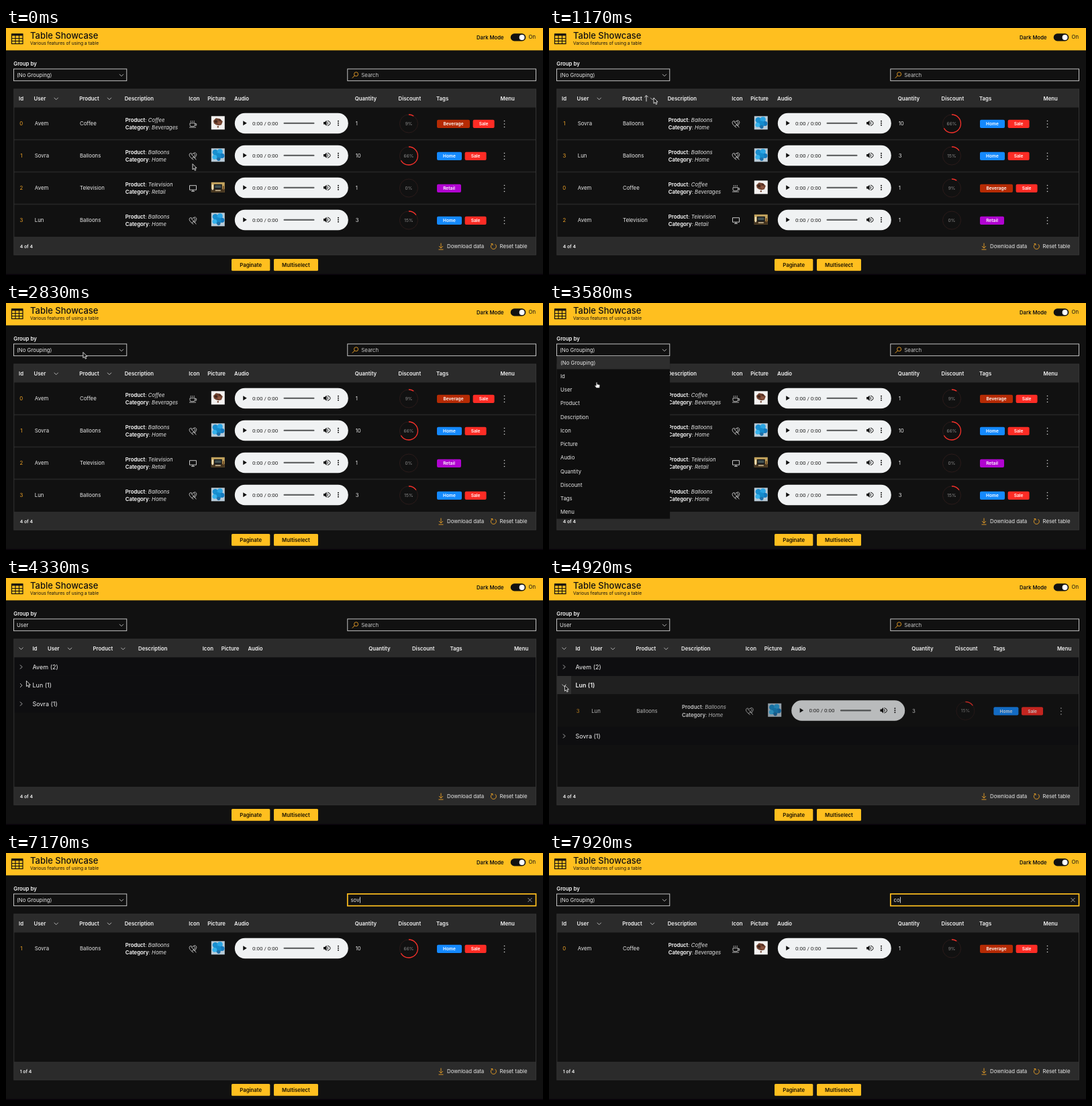
Animation of 800x368 px, one loop 8 s. Source, as an HTML page:

```html
<!DOCTYPE html>
<html lang="en">
<head>
<meta charset="utf-8">
<title>Table Showcase</title>
<style>
  html, body { margin: 0; width: 100%; height: 100%; overflow: hidden; background: #111; }
  svg { display: block; width: 100vw; height: 100vh; font-family: Inter, sans-serif; }
  text { white-space: pre; }
</style>
</head>
<body>
<svg id="stage" viewBox="0 0 800 368" xmlns="http://www.w3.org/2000/svg"></svg>
<script>
const LOOP = 8000, FADE = 450;
const AMBER = '#ffbf1f', ORANGE = '#f0a326', LIGHT = '#e9e9e9', BAR = '#2b2b2b';
const stage = document.getElementById('stage');
const pen = document.createElement('canvas').getContext('2d');

// ---------- drawing helpers ----------
const text = (x, y, s, o = {}) =>
  `<text x="${x}" y="${y}" font-size="${o.size || 7.8}" font-weight="${o.weight || 400}" fill="${o.fill || LIGHT}"` +
  `${o.anchor ? ` text-anchor="${o.anchor}"` : ''}${o.font ? ` font-family="${o.font}"` : ''}>${s}</text>`;
const rect = (x, y, w, h, fill, extra = '') =>
  `<rect x="${x}" y="${y}" width="${w}" height="${h}" fill="${fill}" ${extra}/>`;
const dot = (x, y, r, fill) => `<circle cx="${x}" cy="${y}" r="${r}" fill="${fill}"/>`;
const line = (d, color = LIGHT, w = 0.9, extra = '') =>
  `<path d="${d}" fill="none" stroke="${color}" stroke-width="${w}" ${extra}/>`;
const group = (x, y, body, extra = '') => `<g transform="translate(${x} ${y})" ${extra}>${body}</g>`;
const chevron = (x, y, turn = 0) =>
  group(x, y, `<g transform="rotate(${turn})">${line('M-3 -1.5L0 1.5L3 -1.5', '#c4c4c4', 0.9)}</g>`);

// ---------- data ----------
const products = {
  Coffee: { category: 'Beverages', icon: cupIcon, picture: coffeePicture },
  Balloons: { category: 'Home', icon: heartIcon, picture: balloonPicture },
  Television: { category: 'Retail', icon: screenIcon, picture: screenPicture }
};
const tags = {
  Beverage: [49, '#b52b04'], Sale: [32, '#fd2c25'], Home: [37, '#1489fd'], Retail: [36, '#b004d0']
};
const rows = [
  { id: 0, user: 'Avem', product: 'Coffee', quantity: 1, discount: 9, tags: ['Beverage', 'Sale'] },
  { id: 1, user: 'Sovra', product: 'Balloons', quantity: 10, discount: 66, tags: ['Home', 'Sale'] },
  { id: 2, user: 'Avem', product: 'Television', quantity: 1, discount: 0, tags: ['Retail'] },
  { id: 3, user: 'Lun', product: 'Balloons', quantity: 3, discount: 15, tags: ['Home', 'Sale'] }
];
const columns = {
  Id: 19, User: 41.5, Product: 109.2, Description: 176.7, Icon: 272.3, Picture: 300.3,
  Audio: 340, Quantity: 519.8, Discount: 584.6, Tags: 641, Menu: 736.5
};

// ---------- icons and pictures, centred on 0,0 ----------
function cupIcon() {
  return line('M-4.5 -1H3V2Q3 4-0 4H-2Q-4.5 4-4.5 2ZM3 0H5.2V2.4H2.8M-5.5 5.3H4.5M-3 -2.3Q-4 -3.3-3 -4.6M-.5 -2.3Q-1.5 -3.3-.5 -4.6M2 -2.3Q1 -3.3 2 -4.6', '#ddd', 0.8);
}
function heartIcon() {
  return line('M-1.8 3.8L-4.8 .4C-7 -3.4-2.8 -6-1 -2.6C1.4 -5.6 4.6 -2.2 2.4 .2ZM.8 -3.7C2.4 -6.4 6.6 -4 5 -.8L2.8 3L.8 1.9M-1.8 3.8L.8 5.6M2.8 3L4.8 5.6M-3 -3L3 3', '#ddd', 0.8);
}
function screenIcon() {
  return line('M-5 -4H5V2.5H-5ZM0 2.5V4.6M-2.5 4.6H2.5', '#ddd', 0.9);
}
function coffeePicture() {
  return rect(-10, -10, 20, 20, '#f4f2f1') +
    '<path d="M-7 -3L-3 -7L3 -6L7 -2L5 3L1 4L-3 3L-6 1Z" fill="#70422f"/>' +
    dot(-3, -2, 2, '#42261c') + dot(2, 0, 2.4, '#8d5540') + dot(3, -4, 1.4, '#4e2c22') + dot(0, 6, 1.2, '#70422f');
}
function balloonPicture() {
  return rect(-10, -10, 20, 20, '#b9cbd8') +
    dot(-4, -4, 4.2, '#1a8fd0') + dot(3, -5, 4, '#2aa5e4') + dot(6, 1, 3.6, '#1679bd') +
    dot(0, 2, 5, '#158bcc') + dot(-5, 3, 3.4, '#36b2ec') + dot(1, 6, 2.6, '#1f6fa8');
}
function screenPicture() {
  return rect(-10, -7.5, 20, 15, '#c4a45e') + rect(-10, 2.5, 20, 5, '#44341f') +
    rect(-6, -4.5, 12, 7.5, '#16191c') + rect(-4.5, -3, 9, 4, '#435252') +
    rect(-9, -4, 2, 8, '#f0e5c5') + rect(7, -2, 2, 6, '#765027') + rect(-4, 4, 8, 1.5, '#d3c09a');
}

// ---------- table parts ----------
function audio(y) {
  return rect(340.8, y - 15.7, 169, 30.4, '#f0f2f3', 'rx="15.2"') +
    group(0, y - 0.7,
      '<path d="M353.2 -3.5V3.5L358.8 0Z" fill="#111"/>' +
      text(367, 2.7, '0:00 / 0:00', { size: 8, fill: '#222', font: 'Roboto, sans-serif' }) +
      rect(413.5, -1.1, 46, 2.2, '#636566', 'rx="1"') +
      '<path d="M473 -1.7H475L477.6 -4.2V4.2L475 1.7H473Z" fill="#111"/>' +
      line('M478.8 -2Q480.6 0 478.8 2M479 -3.8Q483.2 -2.6 483.2 0T479 3.8', '#111', 1) +
      [-3, 0, 3].map(d => dot(495, d, 1, '#111')).join(''));
}

function ring(y, percent) {
  const r = 13.5, len = 2 * Math.PI * r;
  const circle = (color, w, extra) =>
    `<circle cx="600" cy="${y}" r="${r}" fill="none" stroke="${color}" stroke-width="${w}" ${extra}/>`;
  return circle('#2b1b1a', 1, '') +
    (percent ? circle('#f5302a', 1.3, `stroke-dasharray="${len * percent / 100} ${len}" transform="rotate(-90 600 ${y})"`) : '') +
    text(600, y + 2.4, percent + '%', { size: 6.7, fill: '#8c8c8c', anchor: 'middle' });
}

function tagList(y, names) {
  let x = 642;
  return names.map(name => {
    const [w, color] = tags[name];
    const out = rect(x, y - 5.8, w, 12.4, color, 'rx="2"') +
      text(x + w / 2, y + 2.8, name, { size: 6.6, weight: 600, fill: '#fff', anchor: 'middle' });
    x += w + 4.6;
    return out;
  }).join('');
}

function tableRow(row, y, shift, opacity) {
  const p = products[row.product];
  const pair = (dy, key, value) =>
    text(177.7, y + dy, `<tspan font-weight="600" fill="#fff">${key}</tspan>: <tspan font-style="italic">${value}</tspan>`);
  return group(shift, 0,
    text(22.8, y + 2.8, row.id, { fill: ORANGE, anchor: 'middle' }) +
    text(42.8, y + 2.8, row.user) + text(110, y + 2.8, row.product) +
    pair(-2.6, 'Product', row.product) + pair(8.5, 'Category', p.category) +
    group(278.5, y + 0.2, p.icon()) + group(315.8, y - 1.2, p.picture()) +
    audio(y) + text(520.7, y + 2.8, row.quantity) + ring(y, row.discount) + tagList(y, row.tags) +
    [-4, 0.5, 5].map(d => dot(742.5, y + d, 0.8, '#ddd')).join(''),
    `opacity="${opacity.toFixed(3)}"`);
}

function tableHead(s) {
  const dx = s.group ? 20.4 : 0;
  const names = Object.entries(columns).map(([name, x]) =>
    text(x, 108, name, { weight: 600, fill: '#f2f2f2' })).join('');
  const arrow = s.sort ? group(145, 105,
    line('M0 -4.5V4.5M-2.7 1.8L0 4.5L2.7 1.8', '#ddd', 1, s.sort > 0 ? 'transform="scale(1 -1)"' : '')) : '';
  return rect(12, 91, 777.5, 27.5, BAR) + (s.group ? chevron(22.5, 105) : '') +
    group(dx, 0, names + chevron(74.7, 105.3) + chevron(154, 105.3) + arrow);
}

function groupedBody(s) {
  let y = 118.5, out = '';
  for (const user of [...new Set(rows.map(r => r.user))].sort()) {
    const own = rows.filter(r => r.user === user), open = s.open === user;
    if (open) out += rect(12, y, 777.5, 27, '#202020') + rect(12, y, 21, 27, '#303030');
    else out += rect(12, y, 777.5, 27, '#0e0e10');
    out += chevron(22.5, y + 14, open ? 0 : -90) +
      text(39.5, y + 17, `${user} (${own.length})`, { size: 9, weight: open ? 600 : 400, fill: '#f2f2f2' });
    y += 27.5;
    if (open) own.forEach(r => {
      out += tableRow(r, y + 24.5, 20.4, s.fade);
      y += 48;
    });
  }
  return out;
}

function flatBody(s) {
  return s.rows.map((r, i) => {
    const y = 142.5 + i * 48;
    return tableRow(r, y, 0, s.fade) + (i < s.rows.length - 1 ? rect(12, y + 23.2, 777.5, 1.6, '#262626') : '');
  }).join('');
}

function banner() {
  return rect(0, 0, 800, 33.3, AMBER) +
    rect(8.5, 9, 16.5, 14.5, 'none', 'stroke="#111" stroke-width="1.2"') + rect(8.5, 8.5, 16.5, 3, '#111') +
    line('M8.5 15.5H25M8.5 19.5H25M14 11V23.5M19.5 11V23.5', '#111', 1.1) +
    text(36, 16.2, 'Table Showcase', { size: 13, weight: 500, fill: '#111' }) +
    text(36, 25, 'Various features of using a table', { size: 6.7, fill: '#111' }) +
    text(701, 16.6, 'Dark Mode', { size: 7.7, weight: 600, fill: '#111' }) +
    rect(751.7, 8.3, 22.6, 11.2, '#111', 'rx="5.6"') + dot(768.6, 13.9, 4, '#fff') +
    text(778.5, 16.4, 'On', { fill: '#111' });
}

function controls(s) {
  const frame = (x, w, color, lw) => rect(x, 61, w, 17.7, '#111', `stroke="${color}" stroke-width="${lw}"`);
  let out = text(11.3, 56, 'Group by', { weight: 600, fill: '#f4f4f4' }) +
    frame(11.5, 168.3, '#d8d8d8', 0.9) + text(16, 72.8, s.group || '(No Grouping)') + chevron(172, 70.3) +
    frame(508.8, 280.7, s.focus ? AMBER : '#d8d8d8', s.focus ? 1.7 : 0.9);
  if (s.query) {
    pen.font = '7.8px Inter, sans-serif';
    const x = 514 + pen.measureText(s.query).width;
    out += text(513.5, 72.6, s.query) + rect(x, 65.5, 0.8, 9, '#fff') +
      line('M777.5 67L783.5 73M783.5 67L777.5 73', '#bbb', 0.8);
  } else {
    out += `<circle cx="521.6" cy="68.8" r="3" fill="none" stroke="${ORANGE}" stroke-width=".9"/>` +
      line('M519.4 71L515.8 74.6', ORANGE, 1) + text(529.3, 72.8, 'Search', { fill: '#c8c8c8' });
  }
  return out;
}

function footer(s) {
  const count = s.group ? 4 : s.rows.length;
  const button = (x, w, label) => rect(x, 344, w, 17.8, AMBER, 'rx="1.5"') +
    text(x + w / 2, 355.8, label, { weight: 600, fill: '#1a1300', anchor: 'middle' });
  return rect(12, 311, 777.5, 27, BAR) +
    text(20.7, 327.6, count + ' of 4', { size: 6.8, weight: 600, fill: '#f2f2f2' }) +
    line('M648 320.5V328M645 325L648 328L651 325M644.5 330H651.5', ORANGE, 0.9) + text(657, 328, 'Download data') +
    line('M724.3 322A4 4 0 1 0 728.6 322.1M722.5 321.5H725V324', ORANGE, 0.9) + text(735.5, 328, 'Reset table') +
    rect(11.8, 91, 777.7, 247, 'none', 'stroke="#343434" stroke-width="1"') +
    button(336, 57.3, 'Paginate') + button(399, 66, 'Multiselect');
}

function menu() {
  const items = ['(No Grouping)', ...Object.keys(columns)];
  return rect(11.5, 79, 168.6, 242.5, '#0e0e0e') + rect(11.5, 79, 168.6, 19.6, '#2e2e2e') +
    items.map((name, i) => text(17, 91.5 + i * 20.27, name)).join('');
}

// ---------- pointer ----------
const path = [
  [0, 278, 202.5], [150, 278, 202.5], [700, 156, 104], [1500, 156, 104], [1830, 157.5, 103], [2350, 157.5, 103],
  [2950, 110, 70], [3250, 100, 70], [3580, 71, 118], [3800, 58, 128], [4050, 58, 128],
  [4450, 23, 160], [5050, 23.5, 160], [5480, 748, 325], [5700, 748, 325], [5980, 551, 64], [6300, 551, 68]
];
function pointerAt(t) {
  const i = path.findIndex(p => p[0] > t);
  if (i < 0) return path[path.length - 1].slice(1);
  const [t0, x0, y0] = path[i - 1], [t1, x1, y1] = path[i];
  const k = (t - t0) / (t1 - t0), e = k * k * (3 - 2 * k);
  return [x0 + (x1 - x0) * e, y0 + (y1 - y0) * e];
}
function pointer(t) {
  if (t >= 6500) return '';
  const [x, y] = pointerAt(t);
  const shapes = {
    arrow: '<path d="M0 0V8.4L2 6.7L3.4 9.8L4.9 9.1L3.5 6.1H6Z" fill="#111" stroke="#fff" stroke-width=".8"/>',
    hand: '<path d="M-.8 .4Q0 -.6 .8 .4V3L4 3.8Q5 4.1 4.8 5L4.2 8.6H-.4L-2.8 5.4Q-2.6 4.2-.8 5.2Z" fill="#fff" stroke="#222" stroke-width=".6"/>',
    beam: line('M-2 -4.5Q0 -4.5 0 -3V3Q0 4.5-2 4.5M2 -4.5Q0 -4.5 0 -3V3Q0 4.5 2 4.5M-1.2 1H1.2', '#111', 2.2) +
      line('M-2 -4.5Q0 -4.5 0 -3V3Q0 4.5-2 4.5M2 -4.5Q0 -4.5 0 -3V3Q0 4.5 2 4.5M-1.2 1H1.2', '#eee', 0.9)
  };
  const inSearch = x > 508 && y > 60 && y < 79;
  const kind = inSearch ? 'beam' : t > 2900 && t < 4050 ? 'hand' : 'arrow';
  return group(x.toFixed(2), y.toFixed(2), shapes[kind]);
}

// ---------- timeline ----------
const sorting = [[0, 0], [900, 1], [1500, -1], [2250, 0]];
const typing = [
  [0, ''], [6680, 's'], [6830, 'so'], [6980, 'sov'],
  [7420, 'so'], [7490, 's'], [7560, ''], [7680, 'c'], [7800, 'co']
];
const latest = (list, t) => list.filter(e => e[0] <= t).pop()[1];

function stateAt(t) {
  const sort = latest(sorting, t), query = latest(typing, t);
  const expand = 4580, reset = 5650;
  const fadeFrom = t >= reset ? reset : t >= expand ? expand : -FADE;
  const shown = rows.filter(r => (r.user + ' ' + r.product).toLowerCase().includes(query));
  if (sort) shown.sort((a, b) => sort * (a.product.localeCompare(b.product) || a.id - b.id));
  return {
    sort, query, rows: shown,
    group: t >= 4020 && t < reset ? 'User' : '',
    open: t >= expand && t < reset ? 'Lun' : '',
    menu: t >= 3150 && t < 4020,
    focus: t >= 6250,
    fade: Math.min(1, (t - fadeFrom) / FADE)
  };
}

let last = '';
function draw(t) {
  const s = stateAt(t);
  const scene = rect(0, 0, 800, 368, '#111') + rect(0, 366.5, 800, 1.5, '#08020a') + banner() + controls(s) +
    tableHead(s) + (s.group ? groupedBody(s) : flatBody(s)) + footer(s) + (s.menu ? menu() : '') + pointer(t);
  if (scene !== last) stage.innerHTML = last = scene;
}

const start = performance.now();
function tick() {
  draw((performance.now() - start) % LOOP);
  requestAnimationFrame(tick);
}
tick();
</script>
</body>
</html>
```
